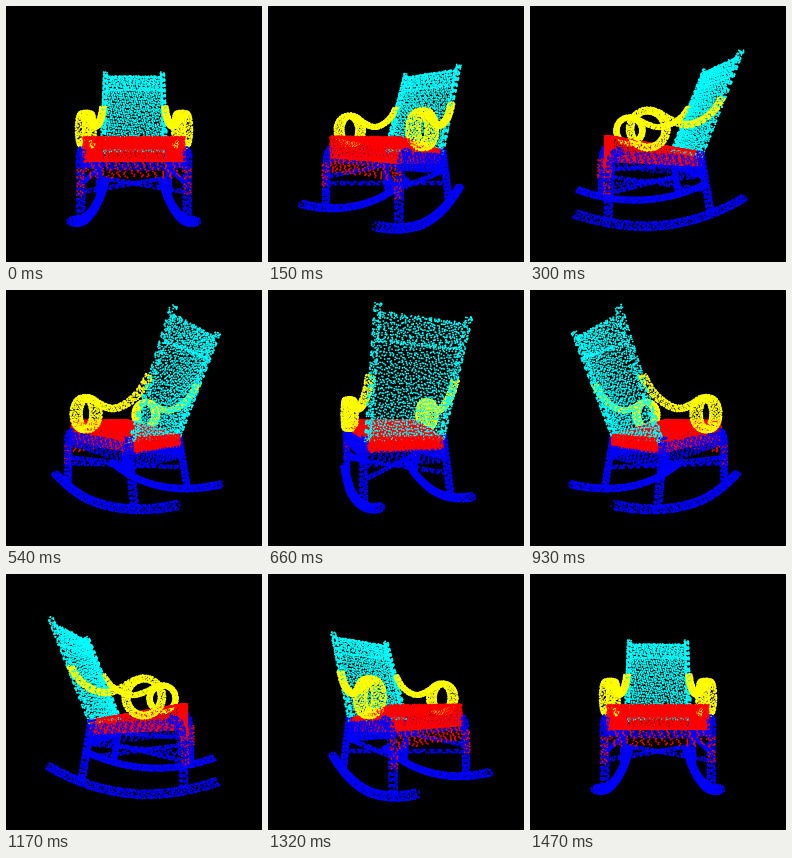
These frames come from a looping animation (256x256 px, 1500 ms). A matplotlib script:

```python
import numpy as np
import matplotlib.pyplot as plt
from matplotlib.animation import FuncAnimation

SIZE = 256
DPI = 100
FRAMES = 50
DIST = 249          # camera distance, equal to focal length in pixels
DOT = 1.75          # dot diameter in pixels
CYAN, YELLOW, RED, BLUE = (0, 1, 1), (1, 1, 0), (1, 0, 0), (0, 0, 1)

rng = np.random.default_rng(4)
clouds, tints = [], []


def add(points, color):
    clouds.append(points)
    tints.append(np.tile(np.array(color, float), (len(points), 1)))


def spread(n):
    """Evenly scattered parameters in the unit square."""
    i = np.arange(n)
    u = rng.random() + i * 0.7548777 + rng.normal(0, 0.15, n) / np.sqrt(n)
    v = rng.random() + i * 0.5698403 + rng.normal(0, 0.15, n) / np.sqrt(n)
    return u % 1, v % 1


def quad(a, b, c, d, n, color):
    """Bilinear patch: a-b is the first edge, d-c the opposite one."""
    a, b, c, d = (np.array(p, float) for p in (a, b, c, d))
    u, v = (t[:, None] for t in spread(n))
    add((a * (1 - u) + b * u) * (1 - v) + (d * (1 - u) + c * u) * v, color)


def smooth(points, count=200):
    """Catmull-Rom curve through the given points."""
    p = np.array(points, float)
    m = np.gradient(p, axis=0)
    t = np.linspace(0, len(p) - 1, count)
    i = np.minimum(t.astype(int), len(p) - 2)
    f = (t - i)[:, None]
    return ((2 * f**3 - 3 * f**2 + 1) * p[i] + (f**3 - 2 * f**2 + f) * m[i]
            + (3 * f**2 - 2 * f**3) * p[i + 1] + (f**3 - f**2) * m[i + 1])


def tube(path, wide, thick, n, color, side=(1, 0, 0)):
    """Sweep an ellipse along a path; wide runs along the side vector."""
    path = np.array(path, float)
    step = np.diff(path, axis=0)
    length = np.r_[0, np.cumsum(np.linalg.norm(step, axis=1))]
    tangent = np.gradient(path, axis=0)
    u, v = spread(n)

    def at(values):
        return np.stack([np.interp(u * length[-1], length, c) for c in values.T], 1)

    normal = np.cross(at(tangent), side)
    normal /= np.linalg.norm(normal, axis=1)[:, None]
    angle = 2 * np.pi * v[:, None]
    add(at(path) + wide * np.cos(angle) * np.array(side, float)
        + thick * np.sin(angle) * normal, color)


def back_z(t):
    return -27 - 43 * t


def back_panel(lo, hi, shift, n):
    u, v = spread(n)
    t = lo + (hi - lo) * v
    add(np.stack([35 * (2 * u - 1), -20 + 99 * t, back_z(t) + shift], 1), CYAN)


def build_back():
    back_panel(0, 0.95, 0, 760)
    back_panel(0, 0.95, -2, 760)
    back_panel(0.76, 0.95, 1, 130)
    back_panel(0.75, 0.77, -4, 50)
    back_panel(0.93, 0.95, -2, 50)
    t = np.linspace(0, 1, 30)
    for s in (-1, 1):
        post = np.stack([s * (35 + 1.5 * t), -22 + 101 * t, back_z(t) - 1], 1)
        tube(post, 2.5, 2.5, 300, CYAN)


def build_arms():
    turn = np.radians(np.arange(0, 361, 6))
    ring = np.stack([21 + 15 * np.sin(turn), 4 + 15 * np.cos(turn)], 1)
    sweep = smooth([(-50, 33), (-40, 20), (-26, 11), (-12, 8),
                    (2, 12), (12, 17), (21, 19)], 80)
    out = np.interp(sweep[:, 0], [-50, 15], [37, 43.5])
    for s in (-1, 1):
        tube(np.c_[s * out, sweep[:, 1], sweep[:, 0]], 3.6, 2.6, 430, YELLOW)
        tube(np.c_[np.full(len(ring), s * 43.5), ring[:, 1], ring[:, 0]],
             6.5, 2.6, 760, YELLOW)


def build_seat():
    fl, fr = (-41, -2, 49), (41, -2, 49)
    rl, rr = (-35, -17, -32), (35, -17, -32)
    flb, frb = (-41, -22, 49), (41, -22, 49)
    rlb, rrb = (-35, -29, -32), (35, -29, -32)
    quad(fl, fr, rr, rl, 1500, RED)
    quad(flb, frb, rrb, rlb, 1100, RED)
    quad(fl, fr, frb, flb, 600, RED)
    quad(rl, rr, rrb, rlb, 420, RED)
    quad(fl, rl, rlb, flb, 420, RED)
    quad(fr, rr, rrb, frb, 420, RED)
    quad(flb, frb, (41, -35, 51), (-41, -35, 51), 170, RED)


def build_frame():
    z = np.linspace(-74, 78, 60)
    curve = -76 + np.where(z > 4, 0.0030, 0.0026) * (z - 4)**2
    bow = np.interp(z, [-74, 20], [36.5, 42])
    for s in (-1, 1):
        tube(np.stack([s * bow, curve, z], 1), 4, 3, 850, BLUE)
        tube(smooth([(s * 43, -13, 42), (s * 43, -18, 50), (s * 42, -40, 52),
                     (s * 42, -68, 53)], 40), 3, 3, 330, BLUE)
        tube([(s * 42, -25, 53.5), (s * 42, -48, 54)], 2.5, 2.5, 35, RED)
        tube([(s * 37, -15, -28), (s * 39, -42, -32), (s * 40, -71, -37)],
             3, 3, 330, BLUE)
        # side rails, side stretchers and crossed braces
        quad((s * 43, -13, 50), (s * 37, -20, -32), (s * 37, -39, -32),
             (s * 43, -27, 50), 400, BLUE)
        tube([(s * 42, -40, 52), (s * 38, -37, -30)], 1.6, 1.6, 150, BLUE)
        tube([(s * 36, -50, -33), (-s * 40, -46, 50)], 1.6, 1.6, 200, BLUE)
    quad((-37, -28, -33), (37, -28, -33), (37, -41, -33), (-37, -41, -33), 320, BLUE)


build_back()
build_arms()
build_seat()
build_frame()
points = np.concatenate(clouds)
colors = np.concatenate(tints)


def project(k):
    """Screen positions and colors, sorted from far to near."""
    a = 2 * np.pi * k / (FRAMES - 1)
    x, y, z = points.T
    depth = x * np.sin(a) + z * np.cos(a)
    scale = DIST / (DIST - depth)
    across = x * np.cos(a) - z * np.sin(a)
    screen = np.stack([SIZE / 2 + scale * across, SIZE / 2 - scale * y], 1)
    order = np.argsort(depth)
    return screen[order], colors[order]


fig = plt.figure(figsize=(SIZE / DPI, SIZE / DPI), dpi=DPI, facecolor="black")
ax = fig.add_axes([0, 0, 1, 1])
ax.axis("off")
screen, shades = project(0)
dots = ax.scatter(*screen.T, s=(DOT * 72 / DPI)**2, c=shades, linewidths=0)
ax.set(xlim=(0, SIZE), ylim=(SIZE, 0))


def update(k):
    screen, shades = project(k)
    dots.set_offsets(screen)
    dots.set_facecolors(shades)
    return [dots]


anim = FuncAnimation(fig, update, frames=FRAMES, interval=30, repeat=True,
                     repeat_delay=0, blit=False)
plt.show()
```
